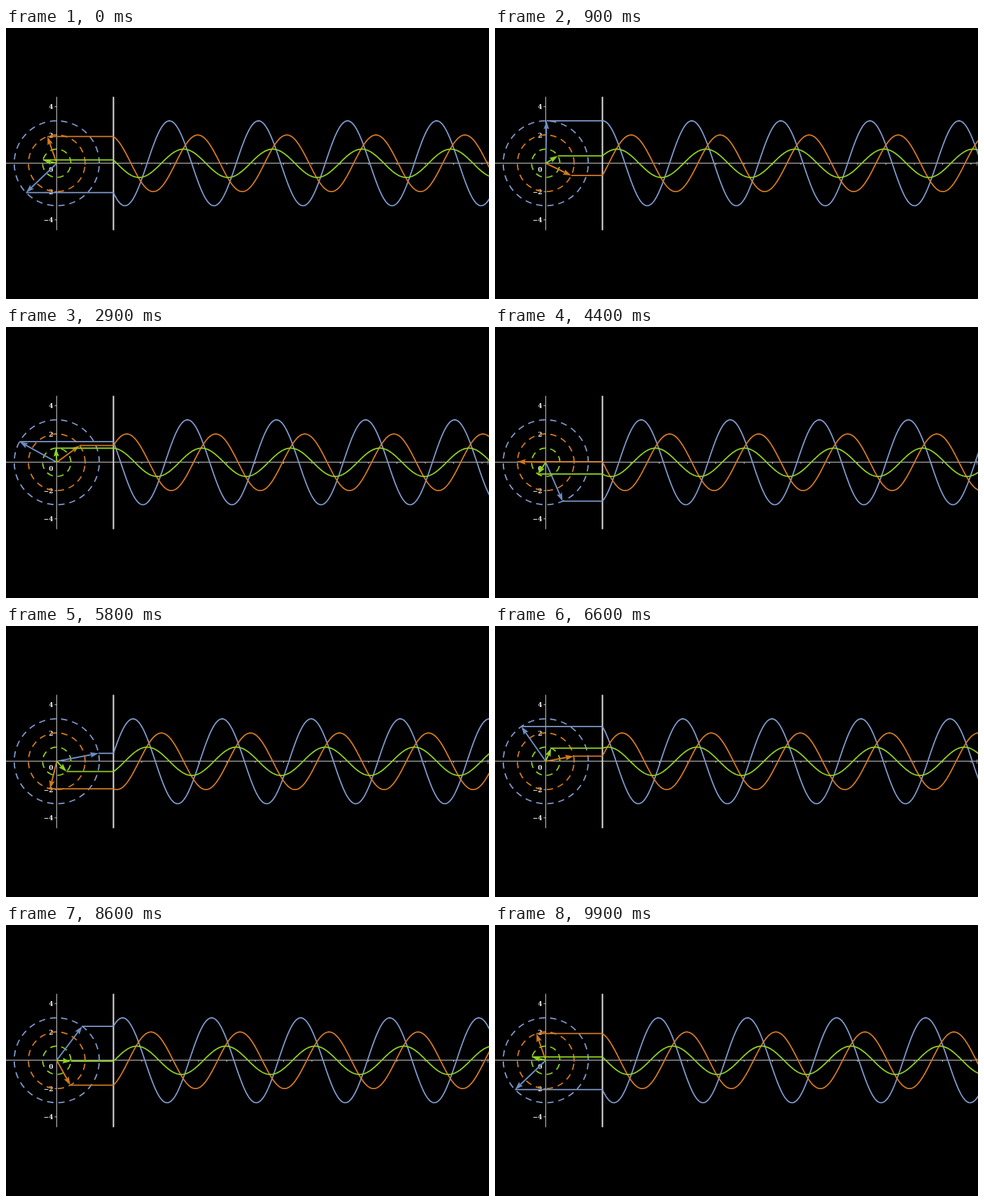
Animation, 690 px wide and 388 px high, one loop 10 s. Source, as an HTML page with a canvas:

```html
<!DOCTYPE html>
<html lang="en">
<head>
<meta charset="utf-8">
<title>Phasors and waves</title>
<style>
  html, body { margin: 0; width: 100%; height: 100%; overflow: hidden; background: #000; }
  canvas { display: block; }
</style>
</head>
<body>
<canvas width="690" height="388"></canvas>
<script>
const ctx = document.querySelector('canvas').getContext('2d');
const W = 690, H = 388;
const CX = 72.5, CY = 193.7, UNIT = 20.25;
const WALL = CX + 4 * UNIT;
const LOOP = 10000, STEP = 100;

const phasors = [
  { r: 3, lead: 1, wave: '#8099cc', arrow: '#6c8dbf' },
  { r: 2, lead: -1, wave: '#d47a22', arrow: '#d07a1c' },
  { r: 1, lead: 0, wave: '#8fd022', arrow: '#8fd022' }
];

// Seconds and angle: two turns clockwise, then back again
const keys = [
  [0, 2.905], [1.8, -1.8], [2.9, -4.649], [4.4, -8.445], [4.83, -9.53],
  [5.8, -7.095], [7.4, -3.108], [9.7, 2.71], [9.8, 2.71], [9.9, 2.905], [10, 2.905]
];

function angleAt(t) {
  const i = Math.max(1, keys.findIndex(k => k[0] >= t));
  const [t0, a0] = keys[i - 1], [t1, a1] = keys[i];
  return a0 + (a1 - a0) * (t - t0) / (t1 - t0);
}

function line(x1, y1, x2, y2, color, width) {
  ctx.strokeStyle = color;
  ctx.lineWidth = width;
  ctx.beginPath();
  ctx.moveTo(x1, y1);
  ctx.lineTo(x2, y2);
  ctx.stroke();
}

function drawAxes() {
  const grey = '#c4c4c4';
  line(0, 193.5, W, 193.5, grey, 1);
  line(CX, 98.5, CX, 289.5, grey, 1);
  for (let x = CX + 2 * UNIT; x < W; x += 2 * UNIT) line(x, 193.5, x, 196, grey, 1);
  line(688.5, 191, 688.5, 197, '#999', 1);

  ctx.fillStyle = '#eee';
  ctx.font = 'bold 9px "DejaVu Serif", "Noto Serif", serif';
  ctx.textAlign = 'right';
  ctx.textBaseline = 'alphabetic';
  for (const v of [4, 2, -2, -4]) {
    const y = CY - v * UNIT;
    line(CX - 3, y, CX, y, grey, 1);
    ctx.fillText(String(v).replace('-', '\u2212'), 67.5, y + 3.5);
  }
  ctx.fillText('0', 67.5, 205.5);
  line(WALL, 98.5, WALL, 289.5, '#dedede', 2);
}

function drawCircle({ r, wave }) {
  ctx.strokeStyle = wave;
  ctx.lineWidth = 1.8;
  ctx.setLineDash([9, 7]);
  ctx.beginPath();
  ctx.arc(CX, CY, r * UNIT, 0, -2 * Math.PI, true);
  ctx.stroke();
  ctx.setLineDash([]);
}

function drawWave({ r, lead, wave }, angle) {
  ctx.strokeStyle = wave;
  ctx.lineWidth = 1.8;
  ctx.lineJoin = 'round';
  ctx.beginPath();
  for (let x = WALL; x <= W + 2; x++) {
    ctx.lineTo(x, CY - r * UNIT * Math.sin(angle + lead + (x - WALL) / UNIT));
  }
  ctx.stroke();
}

function drawArrow({ r, lead, wave, arrow }, angle) {
  const a = angle + lead, len = r * UNIT;
  const x = CX + len * Math.cos(a), y = CY - len * Math.sin(a);
  line(x, y, WALL, y, wave, 1.8);
  ctx.save();
  ctx.translate(CX, CY);
  ctx.rotate(-a);
  line(0, 0, len - 8, 0, arrow, 2);
  ctx.fillStyle = arrow;
  ctx.beginPath();
  ctx.moveTo(len, 0);
  ctx.lineTo(len - 12, -4);
  ctx.lineTo(len - 10, 0);
  ctx.lineTo(len - 12, 4);
  ctx.fill();
  ctx.restore();
}

function frame(now) {
  const t = Math.floor((now % LOOP) / STEP) * STEP / 1000;
  const angle = angleAt(t);
  ctx.fillStyle = '#000';
  ctx.fillRect(0, 0, W, H);
  drawAxes();
  phasors.forEach(drawCircle);
  phasors.forEach(p => drawWave(p, angle));
  phasors.forEach(p => drawArrow(p, angle));
}

const start = performance.now();
function loop() {
  frame(performance.now() - start);
  requestAnimationFrame(loop);
}
loop();
</script>
</body>
</html>
```
